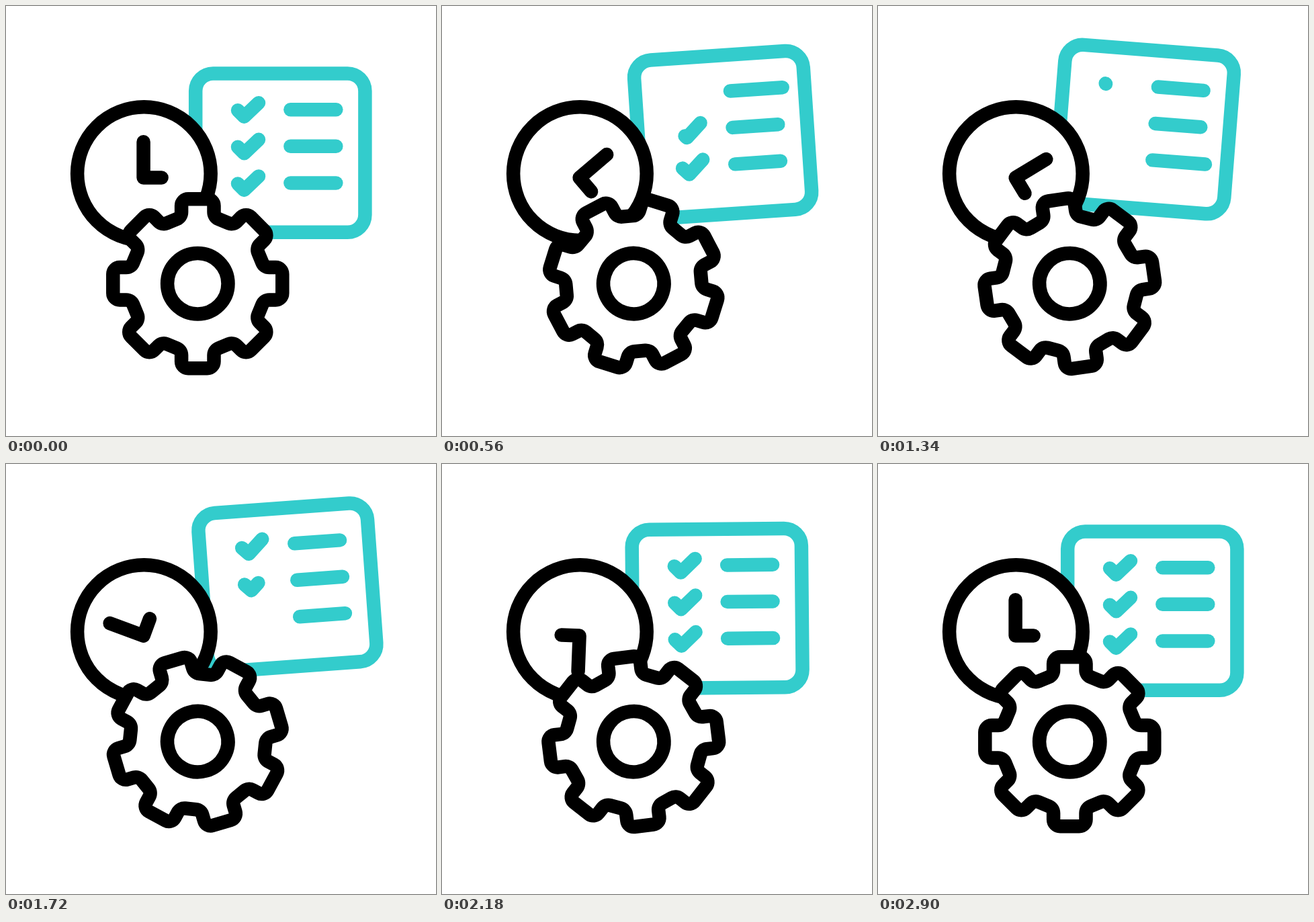
Animation, 640 px wide and 640 px high, one loop 3.26 s. Source, as an HTML page with a canvas:

```html
<!DOCTYPE html>
<html lang="en">
<head>
<meta charset="utf-8">
<title>Time and task management</title>
<style>
html, body { margin: 0; width: 100%; height: 100%; overflow: hidden; background: #fff; }
canvas { display: block; width: 640px; height: 640px; }
</style>
</head>
<body>
<canvas id="stage" width="640" height="640"></canvas>
<script>
const ctx = document.getElementById('stage').getContext('2d');
const LOOP = 3260, STEP = 20, START = 218, END = 2860;
const TEAL = '#33cccc', BLACK = '#000', WHITE = '#fff', LINE = 20.5;
const RAD = Math.PI / 180;

// Key lists: [time, value], eased between neighbours
const HANDS = [[START, 0], [END, 1080]];
const GEAR = [[START, 0], [1540, 375], [1565, 375], [2868, 720]];
const TILT = [[START, 0], [715, -5], [1265, 5], [1820, -5], [2270, 0]];
const LIFT = [[START, 0], [715, -34.6], [1820, -34.6], [2270, 0], [2565, -62], [END, 0]];
const ERASE = [218, 478, 738];
const DRAW = [1320, 1555, 1790];
const TRIM = 270;

const clamp = u => Math.min(1, Math.max(0, u));
const ease = u => u * u * (3 - 2 * u);
const ramp = (t, start, span) => ease(clamp((t - start) / span));

function track(keys, t) {
  let value = keys[0][1];
  for (let i = 1; i < keys.length; i++) {
    const [t0, v0] = keys[i - 1], [t1, v1] = keys[i];
    if (t >= t0) value = v0 + (v1 - v0) * ramp(t, t0, t1 - t0);
  }
  return value;
}

function turned(x, y, deg, draw) {
  ctx.save();
  ctx.translate(x, y);
  ctx.rotate(deg * RAD);
  draw();
  ctx.restore();
}

function polyline(...pts) {
  ctx.beginPath();
  pts.forEach(([x, y]) => ctx.lineTo(x, y));
  ctx.stroke();
}

function ring(x, y, r) {
  ctx.beginPath();
  ctx.arc(x, y, r, 0, 2 * Math.PI);
  ctx.fill();
  ctx.stroke();
}

function check(y, from, to) {
  if (from >= 1 || to <= 0) return;
  const len = Math.hypot(9.5, 9.5) + Math.hypot(21.5, 20.5);
  ctx.setLineDash([(to - from) * len, 200]);
  ctx.lineDashOffset = -from * len;
  polyline([345, y + 1], [354.5, y + 10.5], [376, y - 10]);
  ctx.setLineDash([]);
}

function panel(t) {
  const px = 408.3, py = 72;
  turned(px, py + track(LIFT, t), track(TILT, t), () => {
    ctx.translate(-px, -py);
    ctx.strokeStyle = TEAL;
    ctx.beginPath();
    ctx.roundRect(282.2, 100.4, 252.2, 236.4, 26);
    ctx.fill();
    ctx.stroke();
    for (let i = 0; i < 3; i++) {
      const y = 154.2 + i * 54.6;
      const off = clamp(Math.abs(t - 490 - i * 450) / 270);
      const extra = 12 * Math.cos(off * Math.PI / 2) ** 2;
      polyline([423.4, y], [491.3 + extra, y]);
      if (t < DRAW[0]) check(y, ramp(t, ERASE[i], TRIM), 1);
      else check(y, 0, ramp(t, DRAW[i], TRIM));
    }
  });
}

function clock(t) {
  ctx.strokeStyle = BLACK;
  ring(205.4, 249.6, 99.3);
  turned(204.6, 255.6, track(HANDS, t), () => polyline([0, -53.3], [0, 0], [27, 0]));
}

function gearPath() {
  const w = 24.2, tip = 126, root = 99;
  const pts = [];
  for (let i = 0; i < 8; i++) {
    const c = Math.cos(i * 45 * RAD), s = Math.sin(i * 45 * RAD);
    for (const [x, y, r] of [[-w, -root, 11], [-w, -tip, 10], [w, -tip, 10], [w, -root, 11]]) {
      pts.push([x * c - y * s, x * s + y * c, r]);
    }
  }
  ctx.beginPath();
  ctx.moveTo(0, -tip);
  for (let k = 0; k < pts.length; k++) {
    const a = pts[(k + 2) % pts.length], b = pts[(k + 3) % pts.length];
    ctx.arcTo(a[0], a[1], b[0], b[1], a[2]);
  }
  ctx.closePath();
}

function gear(t) {
  turned(285.3, 413.2, track(GEAR, t), () => {
    gearPath();
    ctx.fill();
    ctx.stroke();
    ring(0, 0, 45.2);
  });
}

function frame(now) {
  const t = Math.floor((now % LOOP) / STEP) * STEP;
  ctx.fillStyle = WHITE;
  ctx.fillRect(0, 0, 640, 640);
  ctx.lineWidth = LINE;
  ctx.lineCap = ctx.lineJoin = 'round';
  panel(t);
  clock(t);
  gear(t);
}

let origin = null;
function tick(now) {
  if (origin === null) origin = now;
  frame(now - origin);
  requestAnimationFrame(tick);
}
frame(0);
requestAnimationFrame(tick);
</script>
</body>
</html>
```
